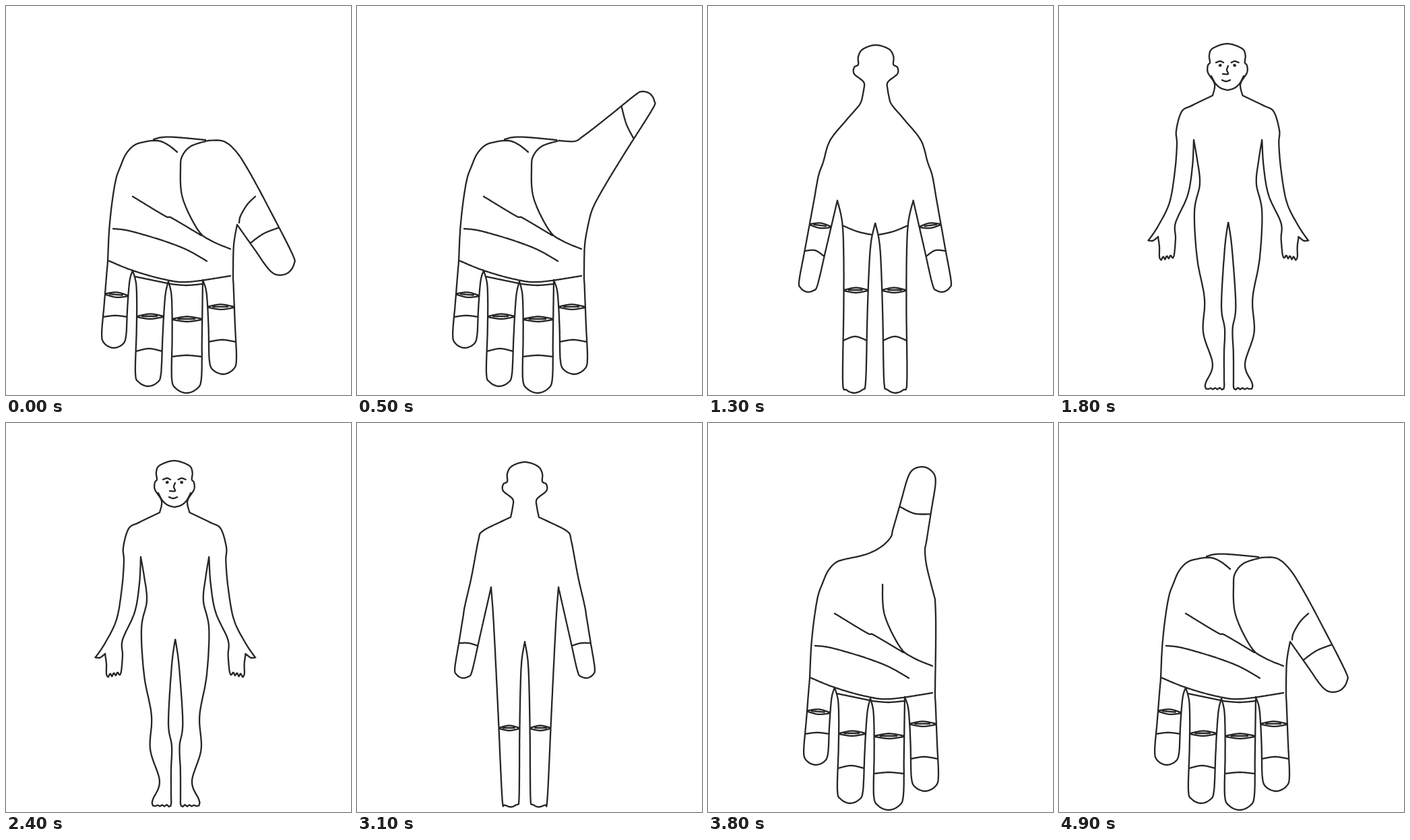
Animation of 512x578 px, one loop 5.1 s. Source, as an HTML page:

```html
<!DOCTYPE html>
<html lang="en">
<head>
<meta charset="utf-8">
<title>Hand to figure</title>
<style>
html, body { margin: 0; width: 100%; height: 100%; overflow: hidden; background: #fff; }
svg { display: block; width: 100%; height: 100%; }
path { fill: none; stroke: #262626; stroke-width: 2.3; stroke-linecap: round; stroke-linejoin: round; }
</style>
</head>
<body>
<svg viewBox="0 0 512 578"><path id="ink"/></svg>
<script>
const mix = (a, b, k) => a + (b - a) * k;
const mixPoint = (a, b, k) => [mix(a[0], b[0], k), mix(a[1], b[1], k)];
const shift = (p, v, d) => [p[0] + v[0] * d, p[1] + v[1] * d];
const distance = (a, b) => Math.hypot(a[0] - b[0], a[1] - b[1]);

// A limb runs from a, around a round tip, back to b; the pinches draw its sides in near the base.
function limb(a, tip, r, b, pinchA = 0, pinchB = 0) {
  const base = mixPoint(a, b, .5), len = distance(base, tip);
  const axis = [(tip[0] - base[0]) / len, (tip[1] - base[1]) / len];
  let across = [axis[1], -axis[0]];
  if ((a[0] - b[0]) * across[0] + (a[1] - b[1]) * across[1] < 0) across = [-across[0], -across[1]];
  const roots = [a, b], ends = [shift(tip, across, r), shift(tip, across, -r)];
  const pinch = [-pinchA, pinchB];
  const side = (s, f) =>
    shift(mixPoint(roots[s], ends[s], f), across, pinch[s] * Math.sin(Math.PI * Math.sqrt(f)));
  const along = (s, y) => Math.max(0, (y - roots[s][1]) / (ends[s][1] - roots[s][1]));
  const steps = [0, .12, .3, .6];
  const arc = [0, .25, .5, .75, 1].map(u =>
    shift(shift(tip, across, r * Math.cos(Math.PI * u)), axis, r * Math.sin(Math.PI * u)));
  const points = [...steps.map(f => side(0, f)), ...arc, ...steps.reverse().map(f => side(1, f))];
  return { points, side, along, axis };
}

function crease(part, fa, fb, bow = -3) {
  const p = part.side(0, fa), q = part.side(1, fb);
  return [p, shift(mixPoint(p, q, .5), part.axis, bow), q];
}

const row = (part, y, bow = -3, tilt = 0) =>
  crease(part, part.along(0, y - tilt / 2), part.along(1, y + tilt / 2), bow);

function joint(part, name, y, tilt = 0) {
  const flat = row(part, y, 0, tilt);
  return {
    ['upper' + name]: row(part, y, -3.5, tilt),
    ['lower' + name]: row(part, y + 1, 3, tilt),
    ['inner' + name]: [mixPoint(flat[0], flat[2], .2), mixPoint(flat[0], flat[2], .75)]
  };
}

// Small bumps for fingers and toes.
const bumps = (from, to, n, h) => Array.from({ length: 2 * n + 1 }, (_, i) =>
  shift(mixPoint(from, to, i / (2 * n)), [0, 1], i % 2 * h));

const flip = (points, sum) => points.map(([x, y]) => [sum(y) - x, y]).reverse();

// Builds both sides of a figure from its left half.
function figure(head, half, sum) {
  const out = { top: [...head, ...flip(head, sum).slice(1)] };
  for (const name in half) {
    out[name + 'L'] = half[name];
    out[name + 'R'] = flip(half[name], sum);
  }
  return out;
}

const little = limb([151, 378], [160, 490], 18, [188, 393], 0, 3);
const ring = limb([188, 393], [211, 546], 19, [241, 409], 5, 3);
const middle = limb([241, 409], [268, 553], 22, [292, 407], 4, 0);
const index = limb([292, 407], [322, 527], 20, [337, 400], 4, 0);

const thenar = [[259, 240], [262, 285], [285, 333], [305, 349], [333, 361]];
const heel = [[205, 202], [190, 207], [178, 220], [170, 238], [163, 258], [157, 295], [153, 335]];

function hand(lead, tail, thumb, before, after, band) {
  return {
    top: [...before, ...thumb.points, ...after],
    armL: [...lead, ...heel, ...little.points],
    legL: ring.points,
    legR: middle.points,
    armR: [...index.points, ...tail],
    band,
    thenar,
    headLine: [[188, 283], [236, 312], [246, 315], [290, 341]],
    heartLine: [[159, 331], [178, 333], [205, 340], [240, 351], [270, 363], [298, 379]],
    base: [[151, 378], [188, 393], [234, 406], [270, 410], [333, 401]],
    hipL: row(ring, 407, 0, 10),
    hipR: row(middle, 413, 2),
    ...joint(little, 'ArmL', 429, 3),
    ...joint(ring, 'LegL', 461),
    ...joint(middle, 'LegR', 465),
    ...joint(index, 'ArmR', 447),
    lineArmL: row(little, 462, -2),
    lineLegL: row(ring, 513, -4),
    lineLegR: row(middle, 521, -2),
    lineArmR: row(index, 499, -3)
  };
}

// s = 0: thumb down at the side, s = 1: thumb swung up.
function openHand(s) {
  const reach = mix(183, 134, s), angle = mix(1, -.93, s);
  const tip = [308 + reach * Math.cos(angle), 225 + reach * Math.sin(angle)];
  const thumb = limb([323, 201], tip, mix(21, 16, s), [343, 325], mix(-9, 4, s), 8 * s);
  const out = hand([[254, 217], [240, 206], [225, 200]], [[338, 355], [343, 325]],
    thumb, [[300, 200]], [], crease(thumb, .78, mix(.42, .8, s)));
  out.thenar = [[300, 200], [275, 208], [262, 222], ...thenar];
  out.cuff = [[219, 198], [232, 195], [252, 195], [296, 199]];
  if (s < .5) out.web = [[346, 322], [348, 312], [358, 295], [370, 283]];
  return out;
}

function thumbUp() {
  const thumb = limb([271, 170], [317, 86], 21, [322, 190]);
  return hand([], [[338, 330], [338, 290], [337, 262]], thumb,
    [[205, 202], [235, 195], [257, 184]], [[325, 215], [337, 262]], crease(thumb, .52, .55, -5));
}

function thumbCentred() {
  const thumb = limb([231, 173], [260, 86], 25, [286, 180]);
  return hand([[236, 199]], [[338, 330], [338, 250], [330, 225], [315, 209], [298, 201], [271, 197]],
    thumb, [[205, 202], [219, 192]], [[292, 198]], crease(thumb, .52, .55, -2));
}

const bareHead = [[228, 140], [231, 125], [231, 113], [217, 101], [217, 91], [223, 87], [223, 75], [230, 64], [249, 58]];

function halfway() {
  const arm = limb([158, 285], [149, 411], 14, [192, 289]);
  const leg = limb([192, 289], [217, 558], 17, [248, 323], 7, 5);
  return figure(bareHead, {
    arm: [[228, 140], [224, 148], [205, 170], [181, 200], [171, 232], [164, 252], ...arm.points],
    leg: leg.points,
    hip: row(leg, 333, 2, 14),
    ...joint(arm, 'Arm', 326, 4),
    ...joint(leg, 'Leg', 422),
    lineArm: row(arm, 368, -5, 8),
    lineLeg: row(leg, 497, -6)
  }, y => 500 - .2 * Math.sqrt(y));
}

function plainFigure() {
  const arm = limb([160, 272], [158, 366], 13, [199, 244]);
  const leg = limb([199, 244], [228, 558], 12.5, [249, 325], 1, 4);
  return figure(bareHead, {
    arm: [[228, 140], [215, 146], [186, 161], [180, 175], [170, 228], ...arm.points],
    leg: leg.points,
    ...joint(leg, 'Leg', 453),
    lineArm: row(arm, 329, -2, 4)
  }, () => 498);
}

function person() {
  const head = [[228, 133], [231, 116], [221, 99], [221, 88], [224, 84], [223, 73], [228, 63], [249.6, 56]];
  const out = figure(head, {
    arm: [[228, 133], [197, 148], [182, 157], [174, 185], [175, 205], [172, 245], [164, 292], [147, 327],
      [133, 348], [133, 348], [139, 349], [147, 343], [147, 343], [149, 358],
      ...bumps([149, 373], [171, 369], 4, 5),
      [173, 345], [173, 322], [191, 281], [198, 238], [200, 199]],
    leg: [[200, 199], [205, 228], [209, 264], [201, 305], [205, 375], [216, 435], [214, 485], [228, 532], [218, 559],
      ...bumps([217, 567], [245, 567], 4, 3),
      [245, 552], [245, 515], [246, 480], [241, 445], [246, 360], [251, 322]],
    chin: [[226, 104], [232, 115], [240, 122], [250, 125]],
    brow: [[233, 84], [239, 82], [244, 84]],
    eye: [[238, 88], [240, 87], [240, 89], [238, 89]]
  }, y => 497 + .3 * Math.sqrt(y));
  out.nose = [[251, 89], [249, 95], [251, 101], [243, 101]];
  out.mouth = [[242, 110], [248, 112], [254, 110]];
  return out;
}

const SAMPLES = 90;

function spline(p0, p1, p2, p3, u) {
  return [0, 1].map(i => .5 * (2 * p1[i] + (p2[i] - p0[i]) * u
    + (2 * p0[i] - 5 * p1[i] + 4 * p2[i] - p3[i]) * u * u
    + (3 * p1[i] - p0[i] - 3 * p2[i] + p3[i]) * u ** 3));
}

// Spread points evenly along a polyline.
function spread(line) {
  const dist = [0];
  for (let i = 1; i < line.length; i++) dist.push(dist[i - 1] + distance(line[i], line[i - 1]));
  const total = dist[dist.length - 1], out = [];
  for (let n = 0, i = 1; n <= SAMPLES; n++) {
    const d = total * n / SAMPLES;
    while (i < line.length - 1 && dist[i] < d) i++;
    out.push(mixPoint(line[i - 1], line[i], (d - dist[i - 1]) / (dist[i] - dist[i - 1] || 1)));
  }
  return out;
}

function smooth(points) {
  const at = i => points[Math.max(0, Math.min(points.length - 1, i))];
  const out = [points[0]];
  for (let i = 0; i < points.length - 1; i++)
    for (let u = 1; u <= 10; u++) out.push(spline(at(i - 1), at(i), at(i + 1), at(i + 2), u / 10));
  return out;
}

// Outlines are split at their farthest point, so that tips stay tips while morphing.
function sample(name, points) {
  const line = smooth(points);
  if (!/^(top|arm|leg)/.test(name)) return spread(line);
  const root = mixPoint(line[0], line[line.length - 1], .5);
  const far = line.map(p => distance(p, root));
  const tip = far.indexOf(Math.max(...far));
  return [...spread(line.slice(0, tip + 1)), ...spread(line.slice(tip))];
}

const sampleAll = pose =>
  Object.fromEntries(Object.entries(pose).map(([name, points]) => [name, sample(name, points)]));

const poses = [openHand(1), thumbUp(), thumbCentred(), halfway(), plainFigure(), person()].map(sampleAll);

function strokesAt(p) {
  if (p < 1) return Object.values(sampleAll(openHand(p)));
  const i = Math.min(Math.floor(p) - 1, poses.length - 2), k = p - 1 - i;
  const a = poses[i], b = poses[i + 1];
  return Object.keys({ ...a, ...b }).map(name => {
    if (a[name] && b[name]) return a[name].map((q, n) => mixPoint(q, b[name][n], k));
    return k < .5 ? a[name] : b[name];
  }).filter(Boolean);
}

// time in ms, place in the sequence: 0 to 1 swings the thumb, then one step per pose
const keys = [
  [0, 0], [600, 1], [800, 2], [900, 2], [1000, 3], [1300, 4], [1500, 5], [1800, 6],
  [2700, 6], [3100, 5], [3200, 4], [3500, 3], [3800, 2], [3900, 2], [4000, 1],
  [4100, .75], [4400, .75], [4500, .25], [4700, 0], [5100, 0]
];
const LOOP = 5100, STEP = 100;

function placeAt(t) {
  const i = keys.findIndex(key => t < key[0]);
  const [t0, p0] = keys[i - 1], [t1, p1] = keys[i];
  return mix(p0, p1, (t - t0) / (t1 - t0));
}

const ink = document.getElementById('ink');
const pathOf = points => 'M' + points.map(p => p[0].toFixed(1) + ' ' + p[1].toFixed(1)).join('L');
let shown = -1;

function draw(time) {
  const t = Math.floor(time % LOOP / STEP) * STEP;
  if (t === shown) return;
  shown = t;
  ink.setAttribute('d', strokesAt(placeAt(t)).map(pathOf).join(''));
}

const start = performance.now();
function tick() {
  draw(performance.now() - start);
  requestAnimationFrame(tick);
}
tick();
</script>
</body>
</html>
```
